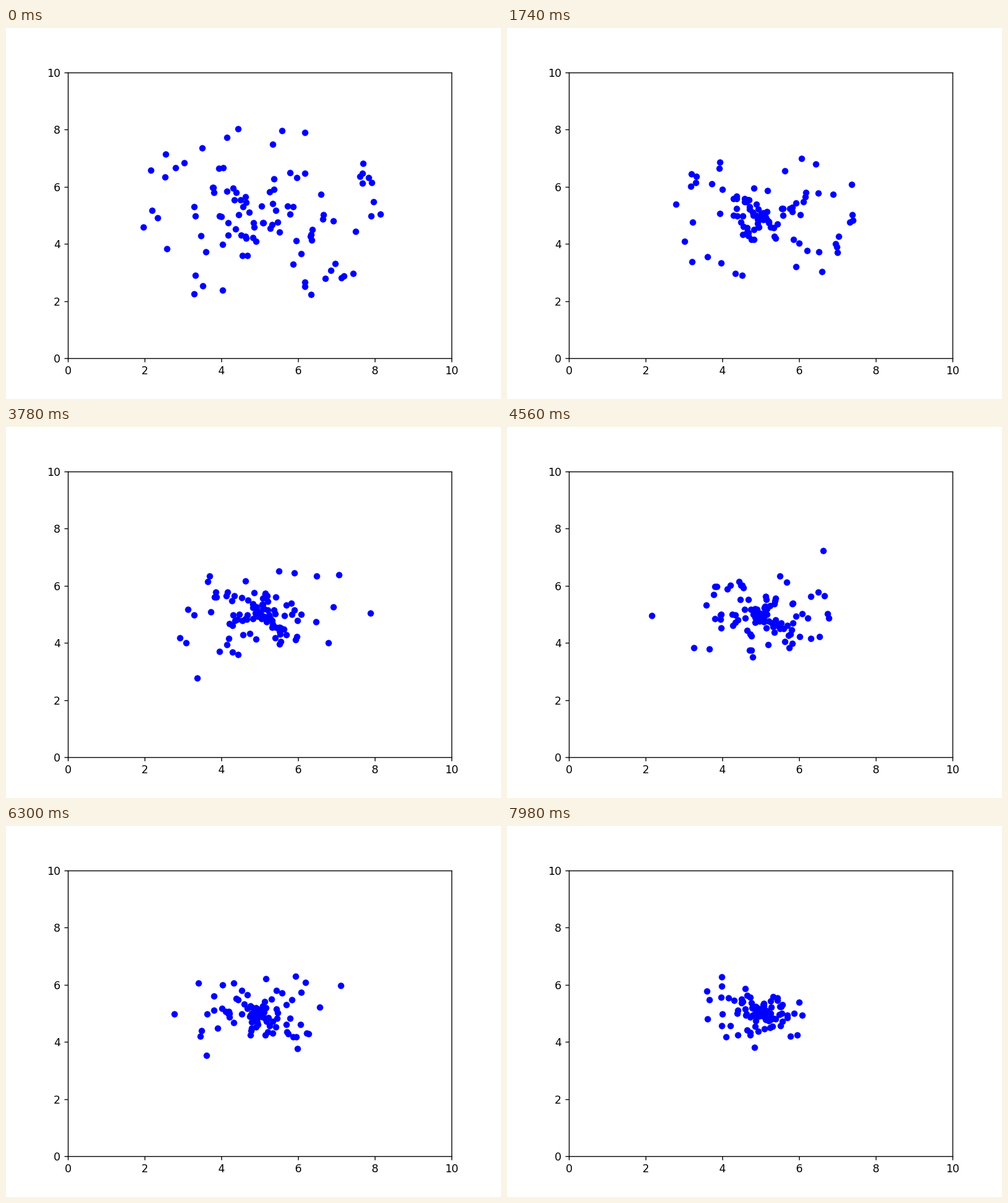
A matplotlib script that plays this animation: 800 by 600 pixels, repeating every 8000 ms.

```python
import numpy as np
import matplotlib.pyplot as plt
from matplotlib.animation import FuncAnimation

LOOP_MS = 8000
FRAMES = 134
SUBSTEPS = 20
PULL = 0.132      # constant pull to the centre, units per frame squared
CENTRE = 5.0

rng = np.random.default_rng(5)

# Long-lived swingers: x, y, outward speed, drag
SWINGERS = np.array([
    (3.33, 4.98, -0.59, 0.001),
    (5.97, 6.33, -0.59, 0.001),
    (6.60, 5.73, 0.57, 0.004),
    (7.70, 6.82, 0.54, 0.012),
])


def shell(count, near, far):
    """Radii and angles of a ring, a little denser on the diagonals."""
    u = rng.uniform(0, 2 * np.pi, count)
    return rng.uniform(near, far, count), u + 0.1 * np.sin(4 * u)


def launch(r, reach, side=1):
    """Speed that carries a particle from radius r out to its reach."""
    return side * np.sqrt(2 * PULL * (reach - r))


def cloud():
    """Radius, angle, outward speed and drag of every particle."""
    r_out, a_out = shell(37, 2.5, 3.3)
    v_out = np.full(r_out.size, -0.15)

    r_mid, a_mid = shell(22, 1.4, 2.0)
    v_mid = launch(r_mid, 4.75 - r_mid)

    r_in, a_in = shell(38, 0.25, 1.35)
    v_in = launch(r_in, r_in + rng.uniform(0.05, 0.5, r_in.size),
                  rng.choice([-1, 1], r_in.size))

    x, y, v_key, drag_key = SWINGERS.T
    r_key = np.hypot(x - CENTRE, y - CENTRE)
    a_key = np.arctan2(y - CENTRE, x - CENTRE)

    r = np.concatenate([r_out, r_mid, r_in, r_key])
    angle = np.concatenate([a_out, a_mid, a_in, a_key])
    v = np.concatenate([v_out, v_mid, v_in, v_key])
    drag = rng.uniform(0.006, 0.02, r.size)
    drag[-drag_key.size:] = drag_key
    return r, angle, v, drag


def simulate():
    """Swing every particle along its own line through the centre."""
    s, angle, v, drag = cloud()
    dt = 1 / SUBSTEPS
    path = []
    for _ in range(FRAMES):
        path.append((CENTRE + s * np.cos(angle), CENTRE + s * np.sin(angle)))
        for _ in range(SUBSTEPS):
            v = (v - PULL * np.sign(s) * dt) * (1 - drag * dt)
            s = s + v * dt
    return path


path = simulate()

fig, ax = plt.subplots(figsize=(6.4, 4.8), dpi=125)
ax.set_xlim(0, 10)
ax.set_ylim(0, 10)
dots, = ax.plot([], [], "bo", markersize=5)


def draw(i):
    dots.set_data(*path[i])
    return dots,


anim = FuncAnimation(fig, draw, frames=FRAMES, interval=LOOP_MS / FRAMES,
                     init_func=lambda: draw(0), repeat=True, repeat_delay=0)
plt.show()
```
